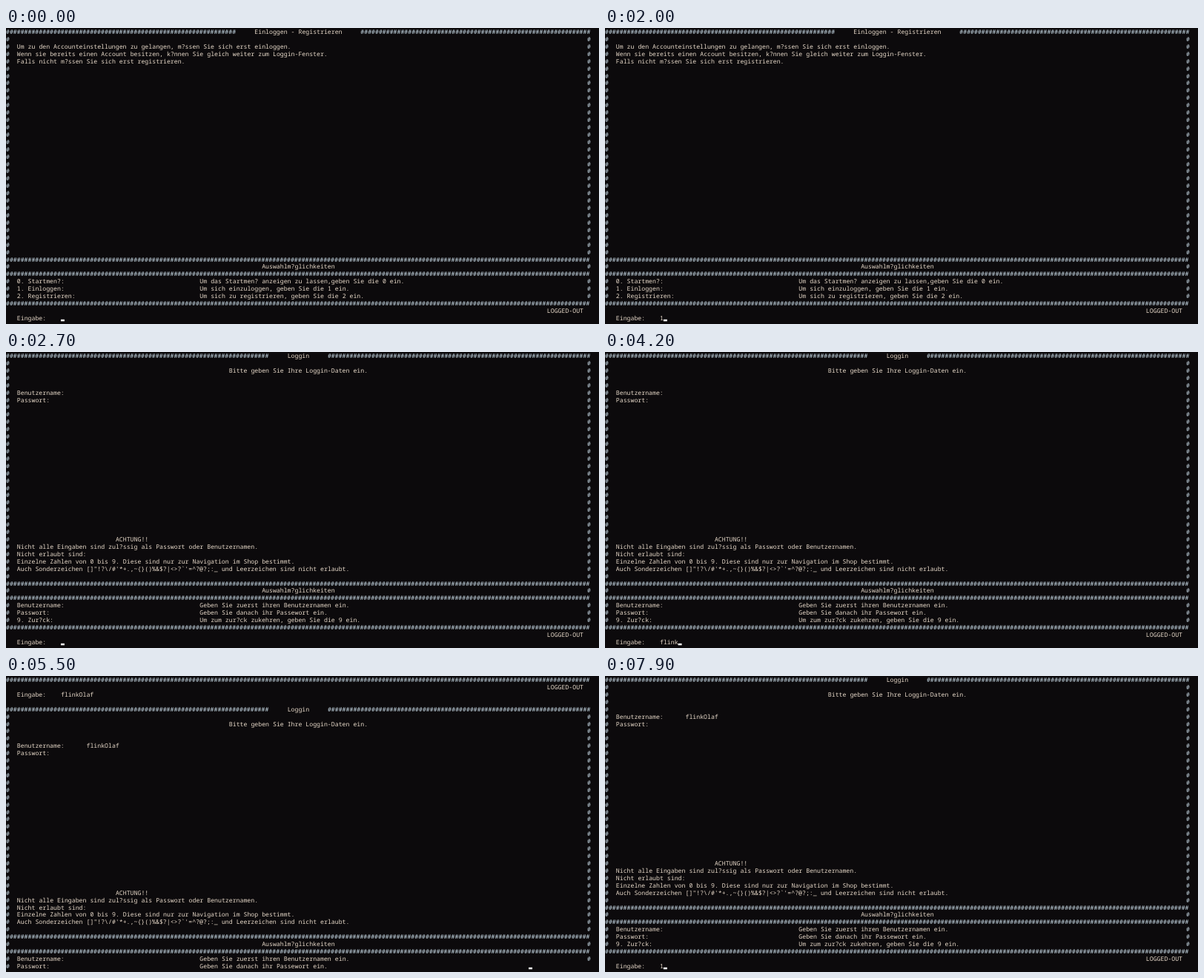
An HTML page with a canvas for the animation above (8000 ms loop, 800x400 px).

```html
<!DOCTYPE html>
<html lang="de">
<head>
<meta charset="utf-8">
<title>Konsole</title>
<style>
html, body { margin: 0; width: 100%; height: 100%; overflow: hidden; background: #0c0a0c; }
canvas { display: block; }
</style>
</head>
<body>
<canvas id="console" width="800" height="400"></canvas>
<script>
const ctx = document.getElementById('console').getContext('2d');
const COLS = 160, ROWS = 40, CELL_W = 4.931, CELL_H = 9.92;
const LOOP = 8000, TICK = 100, BLINK = 530, INPUT_COL = 15;
const USER = 'flinkOlaf';

const rule = '#'.repeat(COLS);
const place = (line, col, text) => line.slice(0, col).padEnd(col) + text + line.slice(col + text.length);
const framed = (...parts) => {
  let line = '#'.padEnd(COLS - 1) + '#';
  for (const [col, text] of parts) line = place(line, col, text);
  return line;
};

// Full 40-row screen: title bar, body rows by index, three options, status and prompt.
function makeScreen(title, body, options) {
  const gap = title.length + 10;
  const bar = '#'.repeat((COLS - gap) / 2);
  const lines = [bar + ' '.repeat(5) + title + ' '.repeat(5) + bar];
  for (let row = 1; row <= 30; row++) lines.push(framed(...(body[row] || [])));
  lines.push(rule, framed([70, 'Auswahlm?glichkeiten']), rule);
  for (const [name, help] of options) lines.push(framed([3, name], [53, help]));
  lines.push(rule, place('', 148, 'LOGGED-OUT'), place('', 3, 'Eingabe:'));
  return lines;
}

const menu = makeScreen('Einloggen - Registrieren', {
  2: [[3, 'Um zu den Accounteinstellungen zu gelangen, m?ssen Sie sich erst einloggen.']],
  3: [[3, 'Wenn sie bereits einen Account besitzen, k?nnen Sie gleich weiter zum Loggin-Fenster.']],
  4: [[3, 'Falls nicht m?ssen Sie sich erst registrieren.']]
}, [
  ['0. Startmen?:', 'Um das Startmen? anzeigen zu lassen,geben Sie die 0 ein.'],
  ['1. Einloggen:', 'Um sich einzuloggen, geben Sie die 1 ein.'],
  ['2. Registrieren:', 'Um sich zu registrieren, geben Sie die 2 ein.']
]);

const login = user => makeScreen('Loggin', {
  2: [[61, 'Bitte geben Sie Ihre Loggin-Daten ein.']],
  5: [[3, 'Benutzername:'], [22, user]],
  6: [[3, 'Passwort:']],
  25: [[30, 'ACHTUNG!!']],
  26: [[3, 'Nicht alle Eingaben sind zul?ssig als Passwort oder Benutzernamen.']],
  27: [[3, 'Nicht erlaubt sind:']],
  28: [[3, 'Einzelne Zahlen von 0 bis 9. Diese sind nur zur Navigation im Shop bestimmt.']],
  29: [[3, 'Auch Sonderzeichen []"!?\\/#\'*+.,~{}()%&$?|<>?`\'=^?@?;:_ und Leerzeichen sind nicht erlaubt.']]
}, [
  ['Benutzername:', 'Geben Sie zuerst ihren Benutzernamen ein.'],
  ['Passwort:', 'Geben Sie danach ihr Passewort ein.'],
  ['9. Zur?ck:', 'Um zum zur?ck zukehren, geben Sie die 9 ein.']
]);

// Each scene prints its screen from `start`, then takes typed keys.
const PRINT_SPEED = 35.9 / 100; // rows per ms
const PRINT_TIME = ROWS / PRINT_SPEED;
const scenes = [
  { start: -PRINT_TIME, screen: menu, input: '1', typeAt: 1700, keyGap: 1 },
  { start: 2300, screen: login(''), input: USER, typeAt: 3500, keyGap: 165 },
  { start: 5400, screen: login(USER), input: '1', typeAt: 7600, keyGap: 1 }
];

const withInput = (screen, text) => [...screen.slice(0, -1), place(screen[ROWS - 1], INPUT_COL, text)];

function stateAt(t) {
  const index = scenes.findLastIndex(s => t >= s.start);
  const scene = scenes[index];
  const printed = (t - scene.start) * PRINT_SPEED;

  if (printed < ROWS) {
    const previous = scenes[index - 1];
    const row = Math.floor(printed);
    const col = Math.floor((printed - row) * COLS);
    const lines = [
      ...withInput(previous.screen, previous.input), '',
      ...scene.screen.slice(0, row), scene.screen[row].slice(0, col)
    ].slice(-ROWS);
    return { lines, col, cursor: true };
  }

  const count = Math.max(0, Math.min(scene.input.length, Math.floor((t - scene.typeAt) / scene.keyGap) + 1));
  const lastEvent = count ? scene.typeAt + (count - 1) * scene.keyGap : scene.start + PRINT_TIME;
  return {
    lines: withInput(scene.screen, scene.input.slice(0, count)),
    col: INPUT_COL + count,
    cursor: (t - lastEvent) % (2 * BLINK) < BLINK
  };
}

function draw(now) {
  const t = Math.floor((now % LOOP) / TICK) * TICK;
  const { lines, col, cursor } = stateAt(t);
  ctx.fillStyle = '#0c0a0c';
  ctx.fillRect(0, 0, 800, 400);
  ctx.font = `500 ${CELL_W / 0.6}px "Noto Sans Mono", monospace`;
  ctx.textRendering = 'geometricPrecision';
  lines.forEach((line, row) => {
    for (const run of line.matchAll(/\S+/g)) {
      ctx.fillStyle = /^#+$/.test(run[0]) ? '#cbdde9' : '#e6d8c8';
      ctx.fillText(run[0], run.index * CELL_W, row * CELL_H + 8);
    }
  });
  if (cursor) {
    ctx.fillStyle = '#fff';
    ctx.fillRect(col * CELL_W, ROWS * CELL_H - 3, CELL_W, 2.5);
  }
  requestAnimationFrame(draw);
}
requestAnimationFrame(draw);
</script>
</body>
</html>
```
